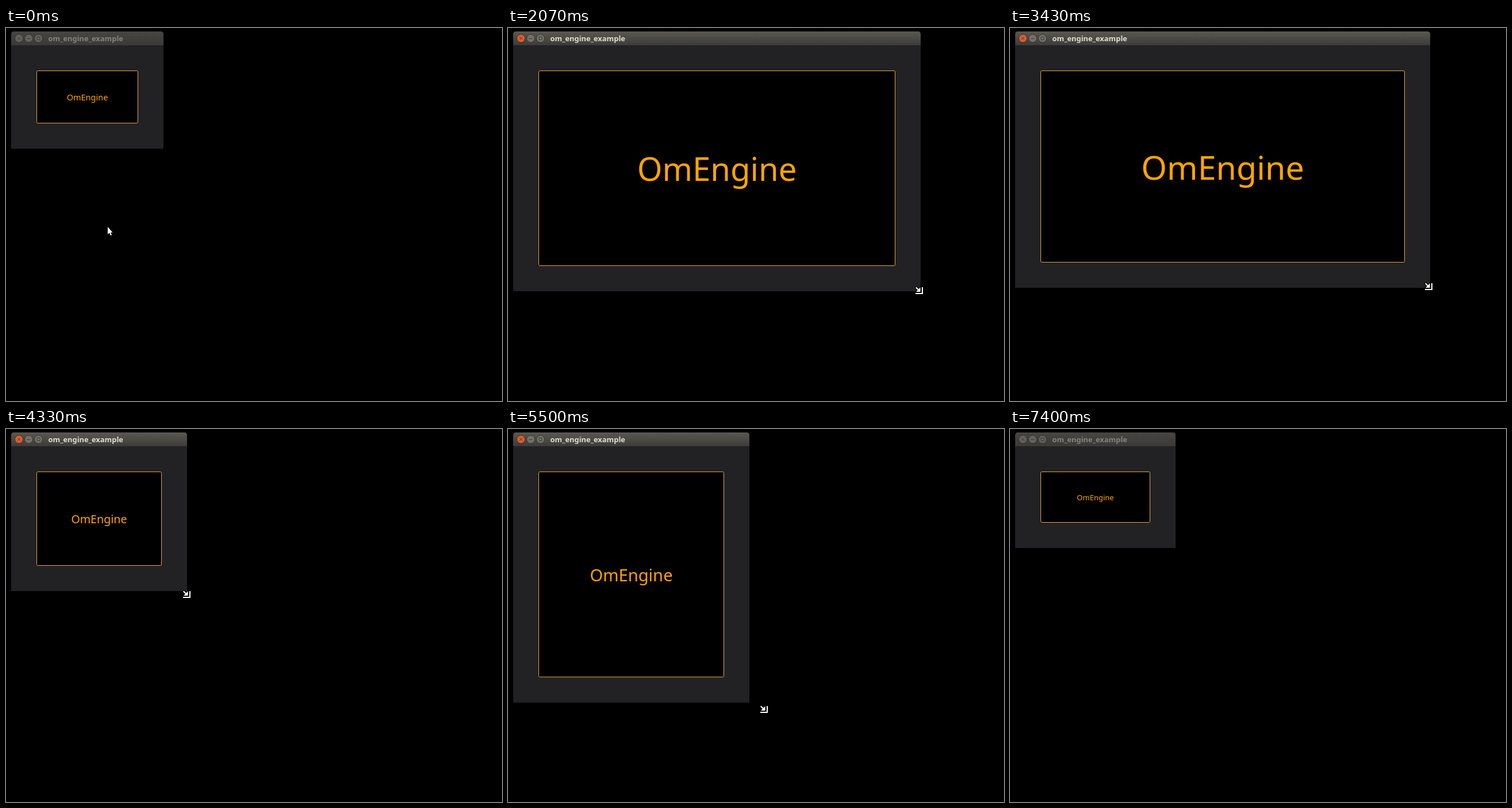
An HTML page that plays this animation: 863 by 649 pixels, repeating every 7.43 s.

```html
<!DOCTYPE html>
<html lang="en">
<head>
<meta charset="utf-8">
<title>om_engine_example</title>
<style>
  html, body { margin: 0; width: 100%; height: 100%; overflow: hidden; background: #000; }
  svg { display: block; }
  text { font-family: "Noto Sans", "Open Sans", sans-serif; }
  #title { font-size: 12.9px; font-weight: 700; fill: #e0ddd4; }
  #bar { fill: url(#barOn); }
  .button { fill: #73716a; stroke: #35342f; }
  #close { fill: #e05c30; }
  .glyph { fill: none; stroke: #3a3934; }
  #window.idle #title { fill: #85837a; }
  #window.idle #bar { fill: url(#barOff); }
  #window.idle .button { fill: #64625c; }
  .pointer { fill: #fff; stroke: #000; paint-order: stroke; stroke-width: 2; }
</style>
</head>
<body>
<svg width="863" height="649" viewBox="0 0 863 649">
  <defs>
    <linearGradient id="barOn" x2="0" y2="1">
      <stop stop-color="#5a584f"/><stop offset="1" stop-color="#3d3c39"/>
    </linearGradient>
    <linearGradient id="barOff" x2="0" y2="1">
      <stop stop-color="#474641"/><stop offset="1" stop-color="#3b3a37"/>
    </linearGradient>
  </defs>
  <rect width="863" height="649"/>
  <g id="window">
    <path id="bar"/>
    <rect id="body" x="9" y="30" fill="#222224"/>
    <circle id="close" class="button" cx="22.5" cy="18" r="7"/>
    <circle class="button" cx="39.5" cy="18" r="7"/>
    <circle class="button" cx="56.5" cy="18" r="7"/>
    <path class="glyph" d="M20 15.5l5 5m0-5l-5 5M36.500 18.500h6M54 15.500h5v5h-5z"/>
    <text id="title" x="73.5" y="22.5">om_engine_example</text>
    <rect id="panel" x="53.5" y="74.5" rx="2" fill="#000" stroke="#e6a540"/>
    <text id="label" text-anchor="middle" fill="#ffa500">OmEngine</text>
  </g>
  <path id="arrow" class="pointer" d="M0 0V13L3 10.3L5 15L7 14.2L5 9.7H8.5Z"/>
  <path id="resize" class="pointer" d="M-2-12H0V0H-13V-2H-2ZM-13-11L-11.500-12.500L-7.500-8.500L-4.500-12V-4H-12L-9-7Z"/>
</svg>
<script>
const LOOP = 7430, FRAME = 1000 / 30, LAG = 22;
const GRAB = 720, LEAVE = 7360;
const MIN_RIGHT = 274, MIN_BOTTOM = 207;

// Turning points of each hand movement: [time, position]
const approach = {
  x: [[0, 177], [420, 306], [GRAB, 272]],
  y: [[0, 346], [160, 356], [GRAB, 206]]
};
const drag = {
  x: [[1170, 278], [2056, 722], [2730, 330], [3422, 735], [4310, 319], [4867, 712],
      [5339, 330], [5758, 709], [6065, 340], [6470, 700], [7000, 292]],
  y: [[1170, 215], [2056, 463], [2700, 250], [3400, 457], [4291, 285], [4556, 430],
      [5233, 240], [5530, 500], [6016, 270], [6330, 405], [6700, 212]]
};

const el = id => document.getElementById(id);
const set = (id, attrs) => {
  for (const key in attrs) el(id).setAttribute(key, attrs[key]);
};

// Cosine swing from one turning point to the next
function swing(turns, t) {
  const next = turns.findIndex(turn => turn[0] > t);
  if (next === 0) return turns[0][1];
  if (next < 0) return turns[turns.length - 1][1];
  const [t0, a] = turns[next - 1], [t1, b] = turns[next];
  return a + (b - a) * (1 - Math.cos(Math.PI * (t - t0) / (t1 - t0))) / 2;
}
const follow = (path, t) => [Math.round(swing(path.x, t)), Math.round(swing(path.y, t))];

function drawWindow(right, bottom) {
  const w = right - 98, h = bottom - 119;
  set('bar', { d: `M9 30V11Q9 6 14 6H${right - 5}Q${right} 6 ${right} 11V30Z` });
  set('body', { width: right - 9, height: bottom - 30 });
  set('panel', { width: w, height: h });
  const size = Math.min(w * 0.0906, 13 + (h - 88) / 2);
  set('label', { x: 53.5 + w / 2, y: 74.5 + h / 2 + size * 0.4, 'font-size': size });
}

function drawPointer(id, [x, y], visible) {
  set(id, {
    transform: `translate(${x} ${y})`,
    visibility: visible ? 'visible' : 'hidden'
  });
}

function draw(time) {
  const t = Math.floor((time % LOOP + 4) / FRAME) * FRAME;
  const [x, y] = follow(drag, t - LAG);
  // The window reaches its last width only after the drag has begun
  drawWindow(Math.max(MIN_RIGHT, x - 4), Math.max(MIN_BOTTOM, y - 5));
  el('window').classList.toggle('idle', t < GRAB || t >= LEAVE);
  drawPointer('arrow', follow(approach, t), t < GRAB);
  drawPointer('resize', follow(drag, t), t >= GRAB && t < LEAVE);
}

const start = performance.now();
function tick() {
  draw(performance.now() - start);
  requestAnimationFrame(tick);
}
tick();
</script>
</body>
</html>
```
